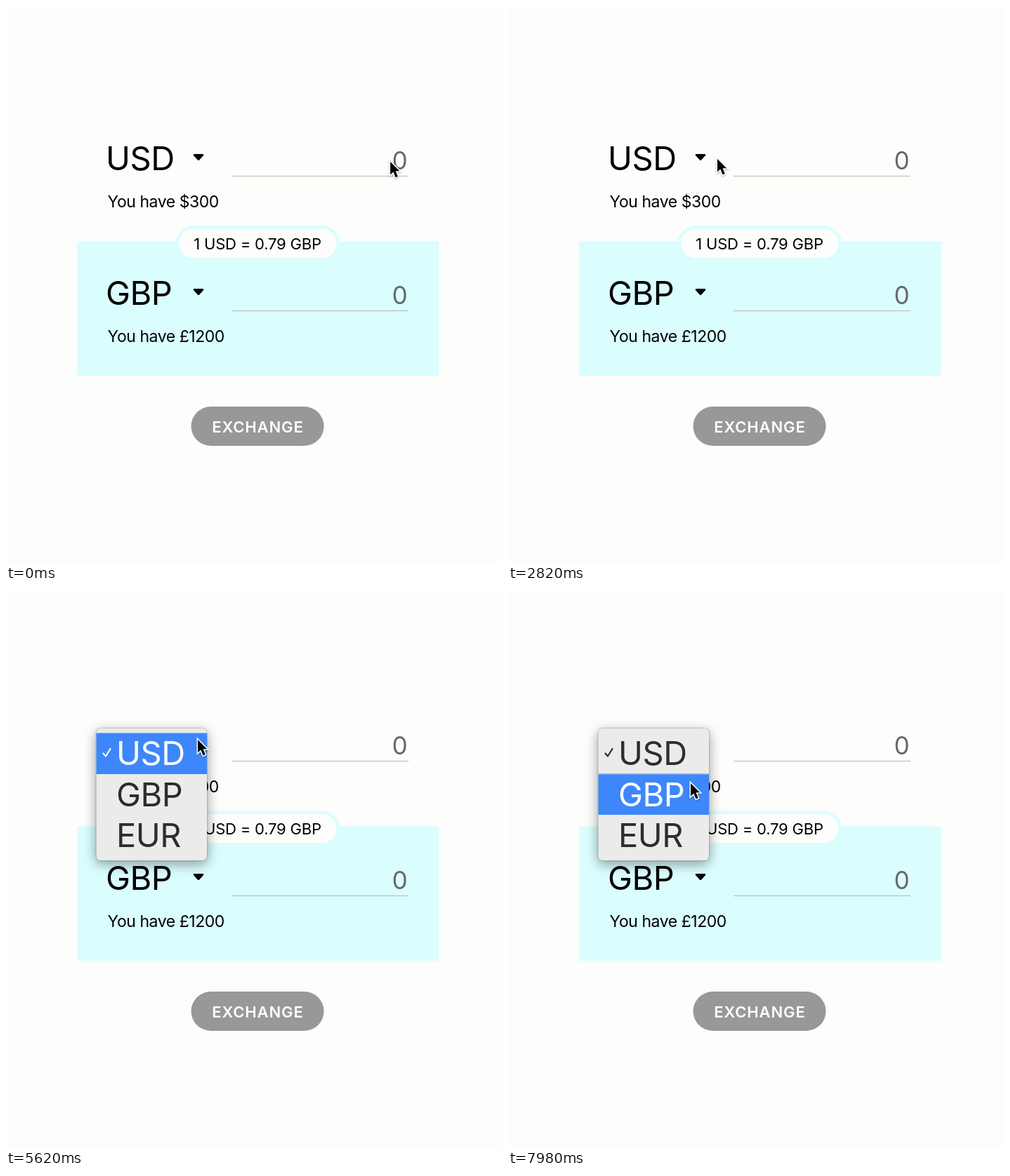
Write an HTML page that moves like this. It is 706 by 794 pixels and loops after 8000 ms.

```html
<!DOCTYPE html>
<html lang="en">
<head>
<meta charset="utf-8">
<title>Currency exchange</title>
<style>
  html, body { margin: 0; width: 100%; height: 100%; overflow: hidden; background: #fdfdfb; }
  svg { display: block; width: 100%; height: 100%; font-family: Inter, "Open Sans", sans-serif; }
  .code { font-size: 47px; letter-spacing: -.5px; }
  .note { font-size: 23px; letter-spacing: -.45px; }
  .amount { font-size: 35px; fill: #686868; text-anchor: end; }
  .rate { font-size: 22px; letter-spacing: -.2px; text-anchor: middle; }
  .label { font-size: 22px; font-weight: 600; letter-spacing: .9px; fill: #fff; text-anchor: middle; }
  .rule { fill: #b9b9b5; }

  .menu, .bar, .first, .second, .check, .cursor { animation: 8s step-end infinite; }
  .menu { animation-name: open; }
  .sheet { filter: drop-shadow(0 5px 9px rgba(0, 0, 0, .3)) drop-shadow(0 0 1px rgba(0, 0, 0, .4)); }
  .bar { fill: #3e87fa; animation-name: highlight; }
  .first { animation-name: deselect; }
  .second { animation-name: select; }
  .check { fill: none; stroke-width: 2.2; stroke-linecap: round; stroke-linejoin: round; animation-name: uncheck; }
  .cursor { animation-name: point; animation-timing-function: linear; }

  @keyframes open { 0% { visibility: hidden } 53.25%, 100% { visibility: visible } }
  @keyframes highlight { 0% { transform: none } 80%, 100% { transform: translateY(58.5px) } }
  @keyframes deselect { 0% { fill: #fff } 80%, 100% { fill: #2d2d2d } }
  @keyframes select { 0% { fill: #2d2d2d } 80%, 100% { fill: #fff } }
  @keyframes uncheck { 0% { stroke: #fff } 80%, 100% { stroke: #2d2d2d } }
  @keyframes point {
    0%, 18.5% { transform: translate(547px, 222px) }
    20.75% { transform: translate(534px, 217px) }
    25% { transform: translate(440px, 209px) }
    30% { transform: translate(325px, 212px) }
    33%, 36% { transform: translate(298px, 218px) }
    42%, 73% { transform: translate(273px, 212px) }
    77.5% { transform: translate(266px, 249px) }
    80.75% { transform: translate(263px, 262px) }
    87%, 100% { transform: translate(260px, 274px) }
  }
</style>
</head>
<body>
<svg viewBox="0 0 706 794">
  <defs>
    <g id="field">
      <path d="M267.5 211h13l1 1.5-6.5 7.3q-1 .9-2 0l-6.5-7.3z"/>
      <rect class="rule" x="321" y="242" width="252" height="1"/>
      <text class="amount" x="571.5" y="233">0</text>
    </g>
  </defs>

  <rect x="101.5" y="335.5" width="515" height="191.5" fill="#dafdfe"/>

  <text class="code" x="142" y="233.5">USD</text>
  <text class="note" x="144.5" y="287">You have $300</text>
  <use href="#field"/>

  <text class="code" x="142" y="425.5">GBP</text>
  <text class="note" x="144.5" y="479">You have £1200</text>
  <use href="#field" y="192"/>

  <rect x="244" y="315.5" width="228.5" height="46" rx="22.5" fill="#fdfdfb" stroke="#dafdfe" stroke-width="4.5"/>
  <text class="rate" x="358" y="347">1 USD = 0.79 GBP</text>

  <rect x="263.5" y="571" width="189" height="56" rx="28" fill="#989898"/>
  <text class="label" x="358.5" y="608">EXCHANGE</text>

  <g class="menu">
    <rect class="sheet" x="128.5" y="196" width="157.5" height="188" rx="6" fill="#ebebea"/>
    <rect class="bar" x="128.5" y="202.5" width="157.5" height="58.5"/>
    <path class="check" d="M138.5 231.5l3.5 4 6.5-10.5"/>
    <text class="code first" x="157" y="248">USD</text>
    <text class="code second" x="157" y="306.5">GBP</text>
    <text class="code" x="157" y="365" fill="#2d2d2d">EUR</text>
  </g>

  <g class="cursor">
    <path d="M0 0V18.5L4.3 14.6 7.6 22.4 10.8 21 7.5 13.3H13.2Z" stroke="#fff" stroke-width="3" paint-order="stroke"
      style="filter: drop-shadow(0 1px 1px rgba(0, 0, 0, .3))"/>
  </g>
</svg>
</body>
</html>
```
